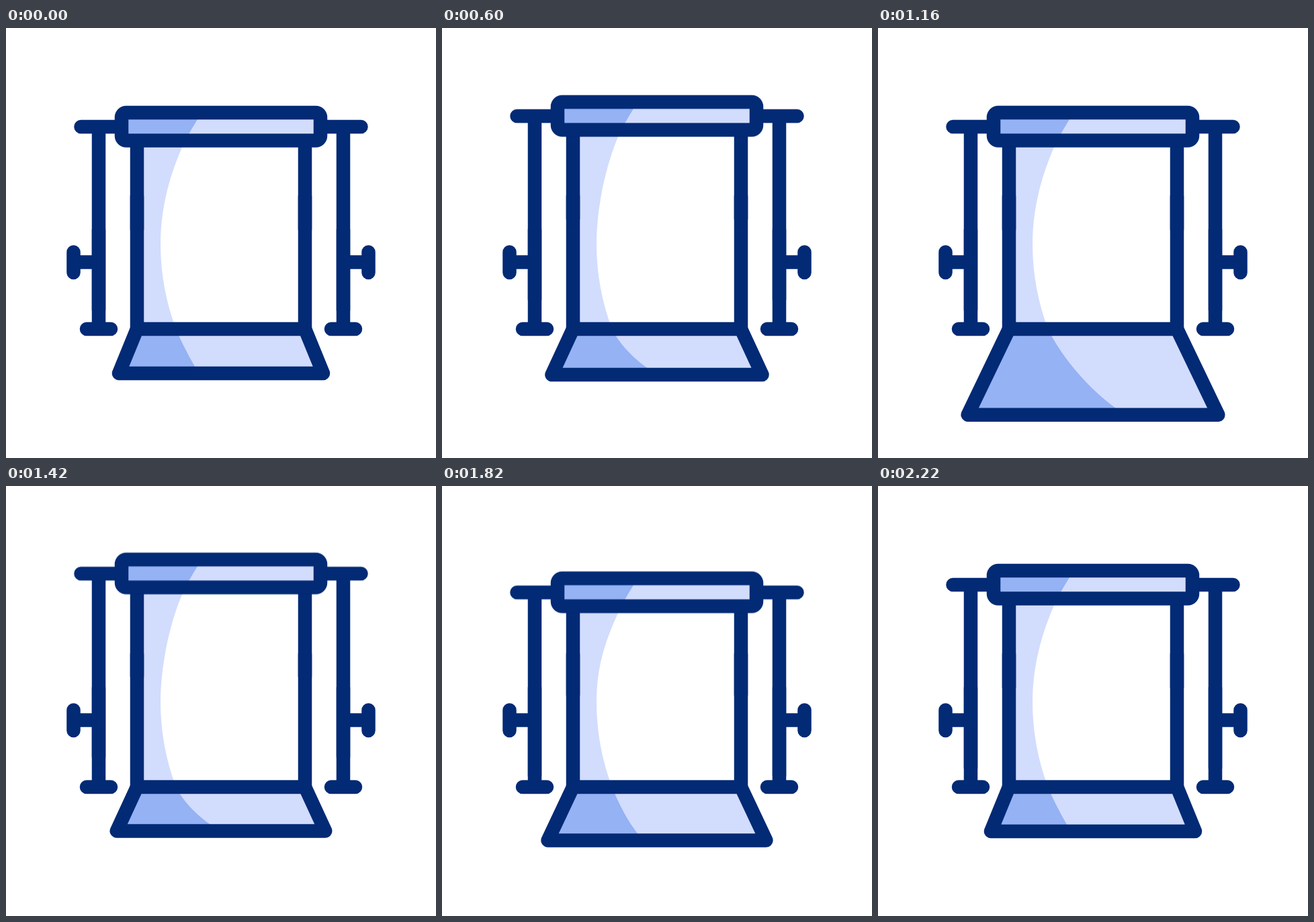
These frames come from a looping animation (640x640 px, 2.4 s). An HTML page:

```html
<!DOCTYPE html>
<html lang="en">
<head>
<meta charset="utf-8">
<title>Photo backdrop</title>
<style>
  html, body { margin: 0; width: 100%; height: 100%; overflow: hidden; background: #fff; }
  svg { display: block; width: 100vw; height: 100vh; }

  .ink { fill: none; stroke: #032a75; stroke-width: 20.5; stroke-linecap: round; stroke-linejoin: round; }
  .light { fill: #d2dcfd; }
  .mid { fill: #94b2f4; }

  .top, .drape, .flap, .shade { animation: 2400ms linear infinite; }
  .top { animation-name: top; }
  .drape { animation-name: drape; }
  .flap { animation-name: flap; }
  .shade { animation-name: shade; }

  /* Poses: rest, squeezed, pulled out, squeezed, overshoot, rest */
  @keyframes top {
    0% { transform: translateY(0); }
    8.333% { transform: translateY(0); animation-timing-function: cubic-bezier(.37, 0, .63, 1); }
    20% { transform: translateY(-26px); animation-timing-function: cubic-bezier(.333, 1, .667, 1); }
    53.333% { transform: translateY(0); animation-timing-function: cubic-bezier(.37, 0, .63, 1); }
    63.333% { transform: translateY(-26px); animation-timing-function: cubic-bezier(.37, 0, .63, 1); }
    75% { transform: translateY(11.5px); animation-timing-function: cubic-bezier(.37, 0, .55, 1); }
    92.5%, 100% { transform: translateY(0); }
  }
  @keyframes drape {
    0% { d: path("M195 167H267C245 213 230 265 230 322C230 365 238 408 253 448H195Z"); }
    8.333% { d: path("M195 167H267C245 213 230 265 230 322C230 365 238 408 253 448H195Z"); animation-timing-function: cubic-bezier(.37, 0, .63, 1); }
    20% { d: path("M195 141H267C245 187 230 265 230 322C230 365 238 408 253 448H195Z"); animation-timing-function: cubic-bezier(.333, 1, .667, 1); }
    53.333% { d: path("M195 167H267C245 213 230 265 230 322C230 365 238 408 253 448H195Z"); animation-timing-function: cubic-bezier(.37, 0, .63, 1); }
    63.333% { d: path("M195 141H267C245 187 230 265 230 322C230 365 238 408 253 448H195Z"); animation-timing-function: cubic-bezier(.37, 0, .63, 1); }
    75% { d: path("M195 178.5H267C245 224.5 230 265 230 322C230 365 238 408 253 448H195Z"); animation-timing-function: cubic-bezier(.37, 0, .55, 1); }
    92.5%, 100% { d: path("M195 167H267C245 213 230 265 230 322C230 365 238 408 253 448H195Z"); }
  }
  @keyframes flap {
    0% { d: path("M195 448L168 514L472 514L445 448Z"); }
    8.333% { d: path("M195 448L168 514L472 514L445 448Z"); animation-timing-function: cubic-bezier(.37, 0, .63, 1); }
    20% { d: path("M195 448L182.5 478L457.5 478L445 448Z"); animation-timing-function: cubic-bezier(.333, 1, .667, 1); }
    53.333% { d: path("M195 448L133.5 576L506.5 576L445 448Z"); animation-timing-function: cubic-bezier(.37, 0, .63, 1); }
    63.333% { d: path("M195 448L182.5 478L457.5 478L445 448Z"); animation-timing-function: cubic-bezier(.37, 0, .63, 1); }
    75% { d: path("M195 448L157.5 527.5L482.5 527.5L445 448Z"); animation-timing-function: cubic-bezier(.37, 0, .55, 1); }
    92.5%, 100% { d: path("M195 448L168 514L472 514L445 448Z"); }
  }
  @keyframes shade {
    0% { d: path("M195 448H253C260 466 275 494 287 514H168Z"); }
    8.333% { d: path("M195 448H253C260 466 275 494 287 514H168Z"); animation-timing-function: cubic-bezier(.37, 0, .63, 1); }
    20% { d: path("M195 448H253C258 458 272 470 293 478H182.5Z"); animation-timing-function: cubic-bezier(.333, 1, .667, 1); }
    53.333% { d: path("M195 448H253C272 488 318 545 369 576H133.5Z"); animation-timing-function: cubic-bezier(.37, 0, .63, 1); }
    63.333% { d: path("M195 448H253C258 458 272 470 293 478H182.5Z"); animation-timing-function: cubic-bezier(.37, 0, .63, 1); }
    75% { d: path("M195 448H253C262 470 276 500 299 527.5H157.5Z"); animation-timing-function: cubic-bezier(.37, 0, .55, 1); }
    92.5%, 100% { d: path("M195 448H253C260 466 275 494 287 514H168Z"); }
  }

  /* Each ray grows outwards, then its inner end catches up */
  .spark path {
    fill: none; stroke: #ffcd50; stroke-width: 20.5; stroke-linecap: round;
    opacity: 0;
    animation: ray 2400ms linear var(--start) infinite;
  }
  @keyframes ray {
    0% { opacity: 1; stroke-dasharray: 0 100; stroke-dashoffset: 0; }
    3.333% { stroke-dasharray: 5 100; stroke-dashoffset: 0; }
    6.875% { stroke-dasharray: 16 100; stroke-dashoffset: 0; }
    10% { stroke-dasharray: 8 100; stroke-dashoffset: -15; }
    12.5% { opacity: 1; stroke-dasharray: 0 100; stroke-dashoffset: -23.9; }
    12.51%, 100% { opacity: 0; stroke-dasharray: 0 100; stroke-dashoffset: -23.9; }
  }
</style>
</head>
<body>
<svg viewBox="0 0 640 640">
  <defs>
    <g id="stand">
      <path d="M138 300V448M120 448H156M100.5 333.5V364M100.5 348.5H138"/>
    </g>
    <g id="arm">
      <path d="M111.5 147H172M138 147V420"/>
    </g>
  </defs>

  <path class="light drape" d="M195 167H267C245 213 230 265 230 322C230 365 238 408 253 448H195Z"/>
  <path class="light flap" d="M195 448L168 514L472 514L445 448Z"/>
  <path class="mid shade" d="M195 448H253C260 466 275 494 287 514H168Z"/>

  <g class="ink">
    <path class="flap" d="M195 448L168 514L472 514L445 448Z"/>
    <path d="M195 250V448M445 250V448"/>
    <use href="#stand"/>
    <use href="#stand" transform="matrix(-1 0 0 1 640 0)"/>
  </g>

  <g class="top">
    <g class="ink">
      <path d="M195 167V300M445 167V300"/>
      <use href="#arm"/>
      <use href="#arm" transform="matrix(-1 0 0 1 640 0)"/>
    </g>
    <rect class="light" x="172" y="126" width="296" height="41.5"/>
    <path class="mid" d="M172 126H291.5Q277 148 267 167H172Z"/>
    <rect class="ink" x="172" y="126" width="296" height="41.5" rx="7"/>
  </g>

  <g class="spark" style="--start: 661ms" transform="translate(58 196.5)">
    <path d="M18 0H42"/><path d="M-18 0H-42"/><path d="M0 18V42"/><path d="M0 -18V-42"/>
  </g>
  <g class="spark" style="--start: 735ms" transform="translate(361 360.5)">
    <path d="M18 0H42"/><path d="M-18 0H-42"/><path d="M0 18V42"/><path d="M0 -18V-42"/>
  </g>
  <g class="spark" style="--start: 809ms" transform="translate(573 495)">
    <path d="M18 0H42"/><path d="M-18 0H-42"/><path d="M0 18V42"/><path d="M0 -18V-42"/>
  </g>
</svg>
</body>
</html>
```
